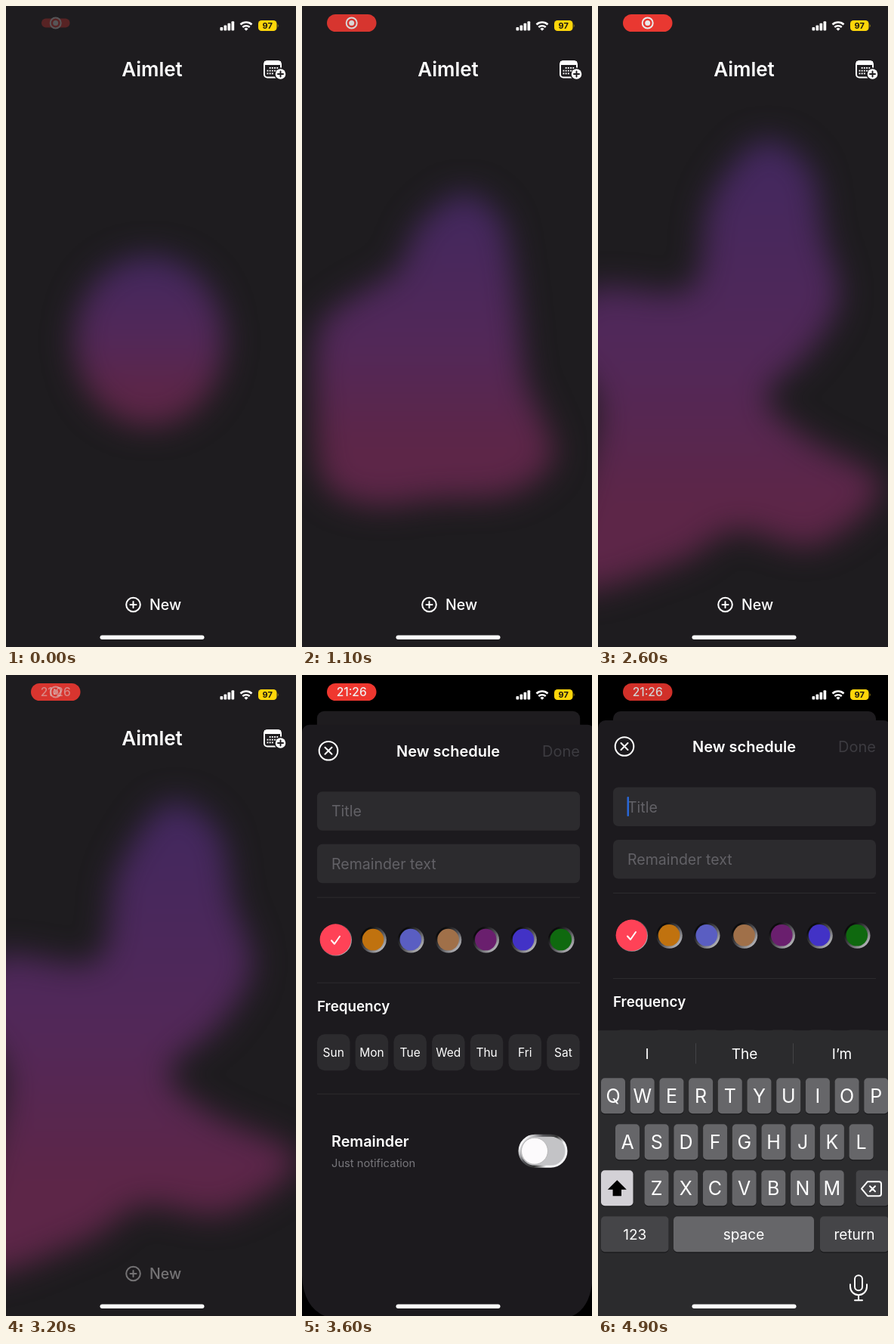
Recreate the animation shown at these times as an HTML page. Size 384x848 px, loop 5000 ms.

```html
<!DOCTYPE html>
<html lang="en">
<head>
<meta charset="utf-8">
<style>
html, body { margin: 0; width: 100%; height: 100%; overflow: hidden; background: #000; }
svg { display: block; width: 384px; height: 848px; font-family: Inter, "Open Sans", sans-serif; fill: #fff; }
.c { text-anchor: middle; }
.line { fill: none; stroke: #fff; stroke-width: 2; stroke-linecap: round; stroke-linejoin: round; }
.b { font-weight: 600; }
</style>
</head>
<body>
<svg viewBox="0 0 384 848">
  <defs>
    <linearGradient id="glow" x2="0" y2="1">
      <stop offset="0" stop-color="#42285f"/>
      <stop offset=".5" stop-color="#532858"/>
      <stop offset=".8" stop-color="#5d2648"/>
    </linearGradient>
    <linearGradient id="bevel" y2="1">
      <stop offset=".2" stop-color="#0c0c0d"/>
      <stop offset=".55" stop-color="#55555a"/>
      <stop offset=".85" stop-color="#b4b4b8"/>
    </linearGradient>
    <linearGradient id="rim" y2=".5">
      <stop offset=".15" stop-color="#f4f4f6"/>
      <stop offset=".4" stop-color="#55555a"/>
      <stop offset=".65" stop-color="#333"/>
      <stop offset=".85" stop-color="#f4f4f6"/>
    </linearGradient>
    <filter id="soft" filterUnits="userSpaceOnUse" x="-120" y="60" width="640" height="860" color-interpolation-filters="sRGB">
      <feGaussianBlur stdDeviation="20"/>
    </filter>
  </defs>
  <rect width="384" height="848" fill="#000"/>

  <g id="home">
    <rect id="card" width="388" height="860" fill="#1e1c1f"/>
    <path id="blob" fill="url(#glow)" filter="url(#soft)"/>
    <text class="c b" x="193.5" y="93" font-size="26">Aimlet</text>
    <g id="calendar">
      <rect class="line" x="342" y="73" width="22" height="21.5" rx="4"/>
      <path d="M342 73h22v5h-22z"/>
      <circle cx="363.5" cy="90" r="8.5" fill="#1e1c1f"/>
      <circle cx="363.5" cy="90" r="6.8"/>
      <path class="line" style="stroke:#1e1c1f" d="M360 90h7M363.5 86.500v7"/>
    </g>
    <g id="add">
      <circle class="line" cx="168.500" cy="792" r="9.300"/>
      <path class="line" d="M164.500 792h8M168.500 788v8"/>
      <text x="190" y="798.500" font-size="19.500" font-weight="500">New</text>
    </g>
  </g>

  <g id="sheet">
    <rect y="60" width="388" height="860" rx="10" fill="#1c1a1e"/>
    <circle class="line" cx="35" cy="94.500" r="12.300"/>
    <path class="line" d="M30.500 90l9 9m0-9l-9 9"/>
    <text class="c b" x="193.500" y="102" font-size="20">New schedule</text>
    <text x="368" y="102" font-size="20" text-anchor="end" fill="#3c3b40">Done</text>
    <g fill="#2c2b2e">
      <rect x="20" y="148.500" width="348" height="51.500" rx="7"/>
      <rect x="20" y="218" width="348" height="51.500" rx="7"/>
      <path d="M20 288h348v1H20zM20 401h348v1H20zM20 548h348v1H20z"/>
    </g>
    <g fill="#626166" font-size="19.500">
      <text x="39" y="181.500">Title</text>
      <text x="39" y="251">Remainder text</text>
    </g>
    <rect id="caret" x="38.500" y="161" width="2.500" height="26" rx="1" fill="#2867d8"/>
    <g id="swatches"></g>
    <text class="b" x="20" y="439" font-size="18.800">Frequency</text>
    <g id="days" font-size="15.500"></g>
    <text class="b" x="39" y="618.500" font-size="19.800">Remainder</text>
    <text x="39" y="645" font-size="14.700" fill="#77767b">Just notification</text>
    <rect x="288" y="603.500" width="62" height="41" rx="20.500" fill="#c3c3c6" stroke="url(#rim)" stroke-width="3"/>
    <circle cx="308" cy="624" r="17.500" fill="#fcfafc" stroke="#aaa" stroke-width=".7"/>
  </g>
  <path id="corners" fill="#000" d="M0 795Q2 836 30 848H0zM384 805Q380 838 358 848H384z"/>

  <g id="keyboard"></g>

  <g id="pill">
    <rect id="pillBox" fill="#ff3b33"/>
    <g id="rec">
      <circle class="line" cx="65.700" cy="22.500" r="7"/>
      <circle cx="65.700" cy="22.500" r="3.500"/>
    </g>
    <text id="clock" class="c" x="65.700" y="28" font-size="15.500" font-weight="500">21:26</text>
  </g>
  <g id="status">
    <path class="line" style="stroke-width:2.600;stroke-linecap:butt" d="M310.500 24.500a11 11 0 0 1 15 0M313.300 28a7 7 0 0 1 9.400 0"/>
    <path d="M318 32.800l-2.600-2.600a3.700 3.700 0 0 1 5.200 0z"/>
    <rect x="334" y="19" width="24.500" height="14" rx="4.300" fill="#ffd60a"/>
    <path d="M359.700 24q2 2 0 4.500z" fill="#a58c12"/>
    <text class="c" x="346.200" y="30" font-size="11" font-weight="700" fill="#1c1a10">97</text>
  </g>
  <rect x="124.500" y="832.500" width="138" height="5.500" rx="2.750"/>
</svg>

<script>
const $ = id => document.getElementById(id);
const put = (id, html) => $(id).insertAdjacentHTML("beforeend", html);
const set = (id, attrs) => { for (const k in attrs) $(id).setAttribute(k, attrs[k]); };
const clamp = v => Math.min(1, Math.max(0, v));
const ramp = (t, a, b) => clamp((t - a) / (b - a));
const mix = (a, b, p) => a + (b - a) * p;
const label = (x, y, s, size) => `<text class="c" x="${x}" y="${y}" font-size="${size}">${s}</text>`;

// Static repeated parts
for (let i = 0; i < 4; i++)
  put("status", `<rect x="${283.5 + i * 5}" y="${28 - i * 2.6}" width="3.700" height="${4.5 + i * 2.6}" rx="1"/>`);

for (let r = 0; r < 3; r++)
  for (let i = r ? 0 : 1; i < (r < 2 ? 5 : 3); i++)
    put("calendar", `<rect x="${345.5 + i * 3.2}" y="${81 + r * 3.7}" width="1.900" height="1.900"/>`);

["#ff4257", "#c0720f", "#5a5ec2", "#a07049", "#6a1f6e", "#4232c6", "#0f690f"].forEach((color, i) => {
  const x = 44.7 + i * 49.75, big = i ? 0 : 4;
  put("swatches", `<circle cx="${x}" cy="344.500" r="${17.3 + big}" fill="url(#bevel)"/>
    <circle cx="${x - .4}" cy="344.300" r="${14.3 + big * 1.6}" fill="${color}"/>`);
});
put("swatches", `<path class="line" d="M39 345.500l4 4.500 7-10"/>`);

["Sun", "Mon", "Tue", "Wed", "Thu", "Fri", "Sat"].forEach((day, i) => {
  const x = 20 + i * 50.7;
  put("days", `<rect x="${x}" y="469.500" width="43.500" height="48" rx="10" fill="#2c2b2e"/>` + label(x + 21.75, 499, day, 15.5));
});

const key = (x, y, w, s = "", size = 25, fill = "#666669") =>
  `<rect x="${x}" y="${y + 1.3}" width="${w}" height="47" rx="5" fill="#19191b"/>
   <rect x="${x}" y="${y}" width="${w}" height="47" rx="5" fill="${fill}"/>` +
  label(x + w / 2, y + (size > 20 ? 32.5 : 30.5), s, size);

put("keyboard", `<rect y="470" width="388" height="378" fill="#2b2b2d"/>
  <path d="M129 487h1v27h-1zM258 487h1v27h-1z" fill="#434346"/>` +
  label(65, 508, "I", 19) + label(194, 508, "The", 19) + label(323, 508, "I’m", 19));
["QWERTYUIOP", "ASDFGHJKL", "ZXCVBNM"].forEach((row, r) =>
  [...row].forEach((ch, i) => put("keyboard", key([4, 23, 61.5][r] + i * 38.7, 533 + r * 61, 32, ch))));
put("keyboard",
  key(4, 655, 42.5, "", 19, "#d3d1d6") + key(341.5, 655, 44, "", 19, "#454548") +
  key(4, 716, 89.5, "123", 19, "#454548") + key(100, 716, 186, "space", 19) +
  key(294, 716, 91, "return", 19, "#454548") +
  `<path d="M25.300 668l12.500 12.500h-6.800v8.500h-11.400v-8.500h-6.800z" fill="#000"/>
   <path class="line" d="M357 670h15q3 0 3 3v13q0 3-3 3h-15l-8-9.500zM360 676l7 7m0-7l-7 7"/>
   <rect class="line" x="340" y="794" width="10" height="20" rx="5"/>
   <path class="line" d="M334 806v3a11 11 0 0 0 22 0v-3M345 820v7M340 827h10"/>`);

// Outline of the glow, clockwise from its top, at four moments
const ring = Array.from({ length: 17 }, (_, i) => {
  const a = i / 17 * 2 * Math.PI;
  return [190 + 99 * Math.sin(a), 443 - 112 * Math.cos(a)];
});
const poses = [
  [0, ring],
  [1100, [[213, 248], [262, 280], [277, 340], [285, 400], [290, 450], [297, 500], [315, 540], [332, 600], [275, 645],
    [175, 652], [95, 660], [30, 630], [18, 530], [22, 430], [60, 390], [125, 350], [155, 290]]],
  [1900, [[220, 192], [280, 230], [295, 310], [308, 390], [270, 455], [232, 505], [285, 560], [358, 625], [285, 715],
    [185, 680], [100, 718], [-50, 735], [2, 535], [-50, 450], [0, 378], [125, 368], [152, 250]]],
  [3200, [[213, 170], [280, 205], [300, 300], [326, 385], [285, 460], [215, 525], [270, 580], [385, 640], [290, 712],
    [180, 702], [100, 750], [-50, 780], [0, 540], [-50, 450], [-10, 372], [120, 378], [148, 260]]]
];

function outline(t) {
  let k = 0;
  while (k < 2 && t > poses[k + 1][0]) k++;
  const [t0, a] = poses[k], [t1, b] = poses[k + 1];
  const u = ramp(t, t0, t1), p = u * (1.25 - .25 * u);
  const pts = a.map((q, i) => [mix(q[0], b[i][0], p), mix(q[1], b[i][1], p)]);
  const at = i => pts[(i + 17) % 17];
  let d = "M" + at(0);
  for (let i = 0; i < 17; i++) {
    const c1 = [0, 1].map(j => at(i)[j] + (at(i + 1)[j] - at(i - 1)[j]) / 6);
    const c2 = [0, 1].map(j => at(i + 1)[j] - (at(i + 2)[j] - at(i)[j]) / 6);
    d += `C${c1} ${c2} ${at(i + 1)}`;
  }
  return d + "Z";
}

// Critically damped spring: what is left of the way, 1 to 0
function rest(t, start) {
  const x = Math.max(0, t - start) * .02;
  return (1 + x) * Math.exp(-x);
}

function draw() {
  const t = performance.now() % 5000;
  const left = rest(t, 3250), up = 1 - left;

  set("blob", { d: outline(t) });
  set("home", { transform: `translate(${20 * up} ${48 * up}) scale(${1 - .103 * up})` });
  set("card", { rx: 11 * up });
  set("add", { opacity: 1 - .62 * ramp(t, 3100, 3200) });
  set("sheet", { transform: `translate(0 ${800 * left})` });
  set("corners", { opacity: ramp(t, 3250, 3400) * (1 - ramp(t, 3700, 4100)) });
  set("caret", { opacity: ramp(t, 4400, 4500) });
  set("keyboard", { transform: `translate(0 ${380 * rest(t, 4400)})` });

  const grow = ramp(t, 0, 400), inset = 14 * (1 - grow);
  const pulse = .91 - .09 * Math.cos((t - 1200) / 1850 * 2 * Math.PI);
  const swap = ramp(t, 3050, 3350);
  set("pillBox", { x: 33 + inset, y: 11 + inset * .4, width: 65.5 - inset * 2, height: 23 - inset * .8, rx: 11.5 - inset * .4 });
  set("pill", { opacity: mix(.25, pulse, grow) });
  set("rec", { opacity: 1 - swap });
  set("clock", { opacity: swap });
  requestAnimationFrame(draw);
}
draw();
</script>
</body>
</html>
```
